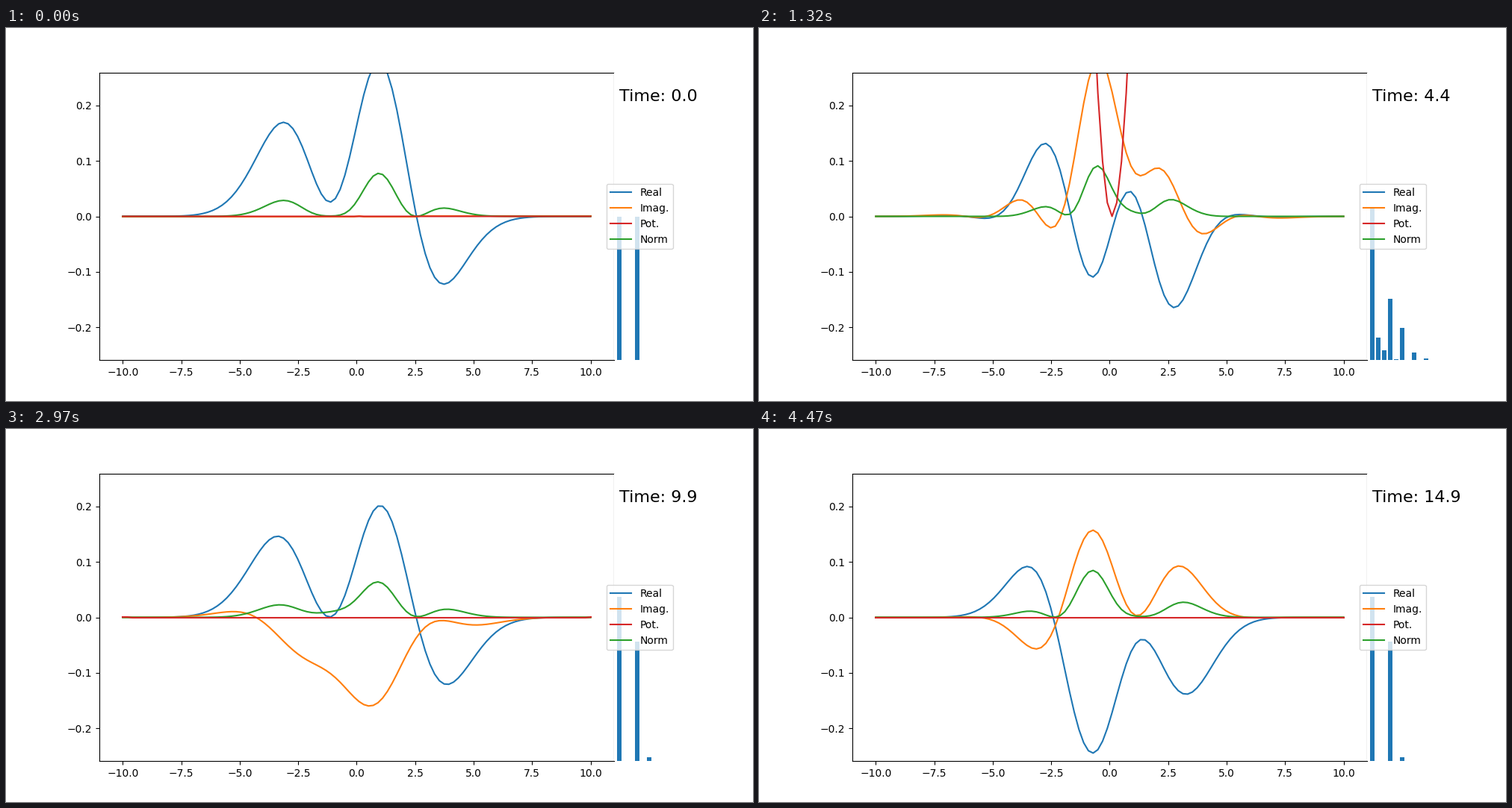
These frames come from a looping animation (1000 by 500 pixels, 4500 ms). A matplotlib script:

```python
import numpy as np
import matplotlib.pyplot as plt
from matplotlib.animation import FuncAnimation

POINTS, STATES, FRAMES = 100, 10, 150
DT = 0.1
DURATION = FRAMES * DT
SPACING = 0.1

q = (np.arange(POINTS) - POINTS // 2) * SPACING
x = np.linspace(-10, 10, POINTS)

laplacian = (np.eye(POINTS, k=1) + np.eye(POINTS, k=-1) - 2 * np.eye(POINTS)) / SPACING**2
energy, basis = np.linalg.eigh(-0.5 * laplacian + np.diag(q**2))
energy, basis = energy[:STATES], basis[:, :STATES]
basis = basis * np.sign(basis[30])


def pulse(t):
    """Extra potential that squeezes the trap for a short while."""
    return 4 * q**2 * np.exp(-((t - DURATION / 4) / (DURATION / 16)) ** 2)


def kick(weights, t):
    """Apply the pulse for one step, in the interaction picture."""
    phase = np.exp(1j * energy * t)
    psi = basis @ (weights / phase)
    weights = phase * (basis.T @ (np.exp(-1j * pulse(t) * DT) * psi))
    return weights / np.linalg.norm(weights)


def simulate():
    weights = np.zeros(STATES, complex)
    weights[[0, 3]] = np.sqrt(0.5)
    history = []
    for n in range(FRAMES):
        weights = kick(weights, n * DT)
        history.append(weights)
    return history


history = simulate()

fig, (ax, side) = plt.subplots(
    1, 2, figsize=(10, 5), dpi=100,
    gridspec_kw=dict(width_ratios=[8, 1], wspace=0))

zero = np.zeros(POINTS)
real, = ax.plot(x, zero, "C0", label="Real")
imag, = ax.plot(x, zero, "C1", label="Imag.")
norm, = ax.plot(x, zero, "C2", label="Norm")
pot, = ax.plot(x, zero, "C3", label="Pot.")
limit = basis[:, 0].max()
ax.set_xlim(-11, 11)
ax.set_ylim(-limit, limit)

bars = side.bar(range(STATES), np.ones(STATES), color="C0")
side.set_ylim(0, 1)
side.set_xticks([])
side.set_yticks([])
side.spines[:].set_visible(False)
side.legend(handles=[real, imag, pot, norm], loc="center right")
clock = side.text(0, 0.9, "", fontsize=16)


def update(n):
    weights = history[n]
    psi = basis @ (np.exp(1j * energy * n * DT) * weights)
    real.set_ydata(psi.real)
    imag.set_ydata(psi.imag)
    norm.set_ydata(abs(psi) ** 2)
    pot.set_ydata(pulse(n * DT))
    for bar, weight in zip(bars, weights):
        bar.set_height(abs(weight) ** 2)
    clock.set_text(f"Time: {n * DT:.1f}")
    return real, imag, norm, pot, clock, *bars


anim = FuncAnimation(fig, update, frames=FRAMES, interval=30, repeat=True)
plt.show()
```
